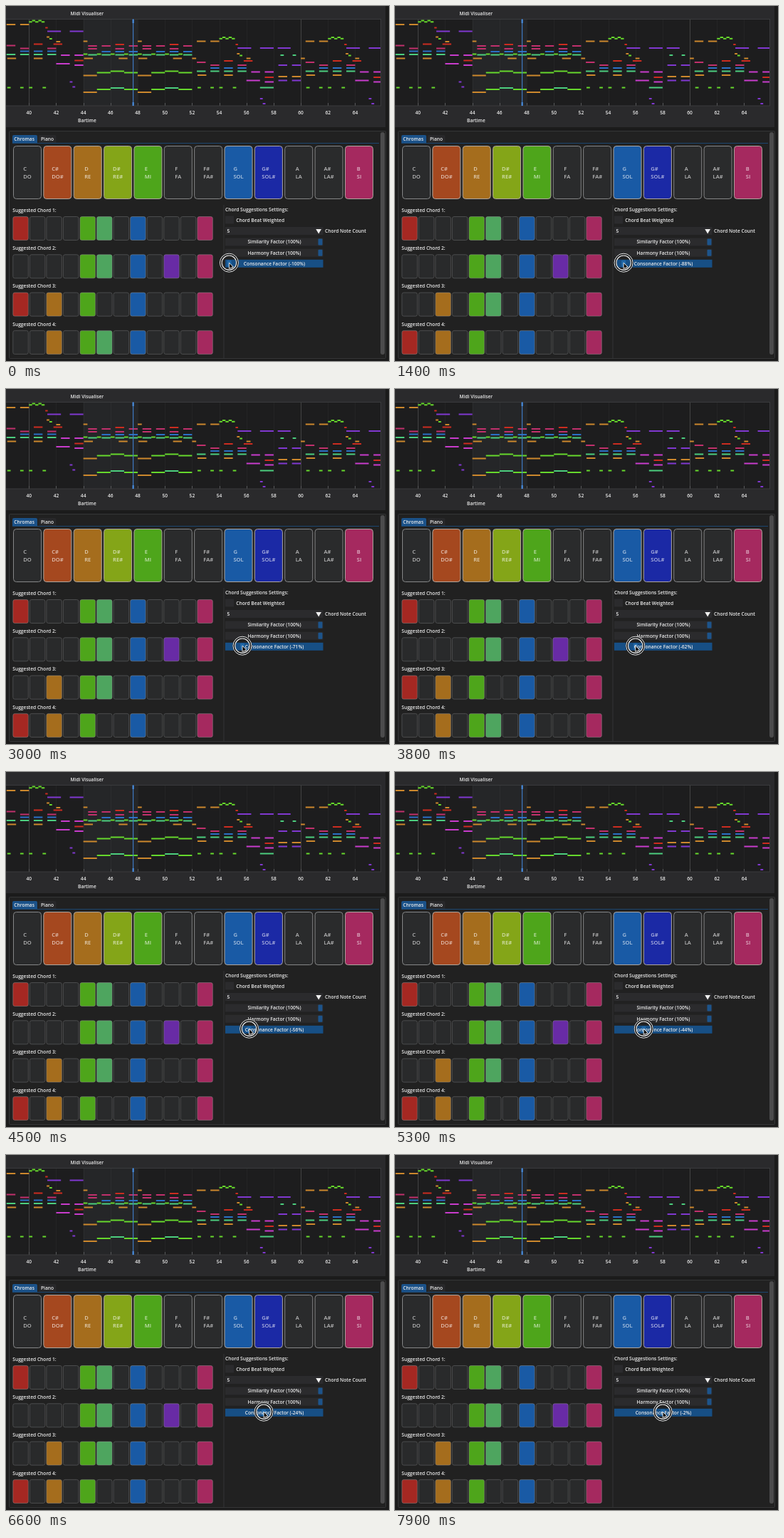
Animation, 538 px wide and 498 px high, one loop 8 s. Source, as an HTML page with a canvas:

```html
<!DOCTYPE html>
<html lang="en">
<head>
<meta charset="utf-8">
<title>Midi Visualiser</title>
<style>
html, body { margin: 0; width: 100%; height: 100%; overflow: hidden; background: #1b1b1b; }
canvas { display: block; }
</style>
</head>
<body>
<canvas id="stage" width="538" height="498"></canvas>
<script>
const ctx = document.getElementById('stage').getContext('2d');
const LOOP = 8000, STEP = 100;
const FONT = '"Open Sans", "Noto Sans", sans-serif';
const INK = '#ececec', FRAME = '#2b2b2d', BLUE = '#174f85';

const NAMES = ['C', 'C#', 'D', 'D#', 'E', 'F', 'F#', 'G', 'G#', 'A', 'A#', 'B'];
const SOLFA = ['DO', 'DO#', 'RE', 'RE#', 'MI', 'FA', 'FA#', 'SOL', 'SOL#', 'LA', 'LA#', 'SI'];
const CHROMA = {
  C: '#a52822', 'C#': '#a5481f', D: '#a56d1d', 'D#': '#84a518', E: '#4ea51b',
  F: '#4ea55f', G: '#195aa5', 'G#': '#1b29a5', A: '#682ba5', B: '#a5295f'
};
const PLAYED = ['C#', 'D', 'D#', 'E', 'G', 'G#', 'B'];
const CHORDS = [
  ['C', 'E', 'F', 'G', 'B'], ['E', 'F', 'G', 'A', 'B'],
  ['C', 'D', 'E', 'G', 'B'], ['D', 'E', 'F', 'G', 'B']
];
const SWAPS = [500, 3200, 4100];

// [time, consonance percent]
const DRAG = [
  [0, -100], [1400, -88], [2200, -80], [3800, -62], [4500, -56],
  [5000, -46], [5100, -46], [5300, -44], [6600, -24], [7900, -2]
];

function consonance(t) {
  const i = DRAG.findIndex(k => k[0] >= t);
  if (i < 1) return DRAG[0][1];
  const [t0, a] = DRAG[i - 1], [t1, b] = DRAG[i];
  return Math.round(a + (b - a) * (t - t0) / (t1 - t0));
}

function rect(x, y, w, h, color) {
  ctx.fillStyle = color;
  ctx.fillRect(x, y, w, h);
}

function box(x, y, w, h, r, fill, line) {
  ctx.beginPath();
  ctx.roundRect(x, y, w, h, r);
  ctx.fillStyle = fill;
  ctx.fill();
  if (!line) return;
  ctx.strokeStyle = line;
  ctx.lineWidth = 1;
  ctx.stroke();
}

// y is the middle of the capitals
function text(s, x, y, align = 'left', size = 6.65, color = INK) {
  ctx.font = `600 ${size}px ${FONT}`;
  ctx.textAlign = align;
  ctx.fillStyle = color;
  ctx.fillText(s, x, y + size * 0.357);
}

/* Piano roll */
const beatX = b => 32.3 + (b - 40) * 19.09;
const NOTE = {
  O: '#cc872c', G: '#66d82c', T: '#4cce7e', P: '#c0306c',
  R: '#cc2c20', B: '#2a70c6', V: '#8038d0', M: '#c83ccc'
};

function note(color, y, from, to) {
  rect(beatX(from), y - 1, beatX(to) - beatX(from), 2, NOTE[color]);
}

function notes(color, y, start, offsets, len = 0.65) {
  for (const o of offsets) note(color, y, start + o, start + o + len);
}

function zigzag(start, y) {
  for (let i = 0; i < 5; i++) note('G', y + (i % 2 ? -1 : 0.8), start + i * 0.23, start + (i + 1) * 0.23);
}

function melody(s, dy) {
  notes('O', 49.5 + dy, s, [0.35, 1.35]);
  zigzag(s + 2, 45 + dy);
  notes('R', 54 + dy, s, [3.2], 0.18);
  notes('V', 59 + dy, s, [3.35, 5], 1);
  notes('O', 67 + dy, s, [3.3], 0.2);
  notes('G', 69.5 + dy, s, [3.5], 0.2);
  notes('O', 73.5 + dy, s, [0, 4], 0.3);
  notes('R', 77 + dy, s, [2.35, 3.8]);
  notes('P', 79 + dy, s, [0.35]);
  notes('P', 83 + dy, s, [1.35, 3.35]);
  notes('B', 87 + dy, s, [1.35, 2.35, 3.35]);
  notes('T', 91.5 + dy, s, [0.35, 1.35, 2.35, 3.35]);
  notes('M', 92.5 + dy, s, [4.35, 5.35]);
  notes('O', 97 + dy, s, [0.4, 2.35]);
  notes('M', 104.5 + dy, s, [4], 1);
  notes('R', 100 + dy, s, [5.35]);
  notes('M', 106.5 + dy, s, [5.35]);
  notes('V', 130 + dy, s, [5], 0.2);
  notes('V', 137 + dy, s, [5.2], 0.2);
  notes('G', 114.5, s, [0.4, 1.35, 2, 3], 0.25);
}

function backing(s) {
  notes('O', 49.5, s, [0], 0.3);
  notes('R', 54, s, [2.35]);
  notes('P', 56, s, [0.35, 1.35, 3.35]);
  notes('P', 60, s, [0.35, 2.35]);
  notes('B', 64, s, [1.35, 2.35, 3.35]);
  notes('G', 67.5, s, [0, 1, 2, 3], 0.3);
  notes('T', 68.5, s, [0.35, 1.35, 2.35, 3.35]);
  notes('O', 73.5, s, [0.05, 2.6]);
  for (const [y, high] of [[97.5, 'G'], [121, 'T']]) {
    note('O', y, s, s + 1);
    note('G', y - 4, s + 1, s + 2);
    note(high, y - 6, s + 2, s + 3);
    note('G', y - 4, s + 3, s + 4);
  }
}

function roll() {
  rect(0, 0, 533, 170, '#2a2a2c');
  rect(0, 18, 526, 122, '#1d1d1e');
  rect(beatX(44), 18, beatX(48) - beatX(44), 122, '#252628');
  for (let b = 40; b < 66; b += 2) {
    const x = Math.round(beatX(b));
    rect(x, 18, 1, 122, b % 20 ? 'rgba(255,255,255,.035)' : 'rgba(255,255,255,.17)');
    rect(x, 136, 1, 4, '#58595b');
    text(b, beatX(b), 149.3, 'center');
  }
  ctx.save();
  ctx.beginPath();
  ctx.rect(0, 18, 526, 122);
  ctx.clip();
  melody(38, -23.5);
  backing(44);
  backing(48);
  melody(52, 0);
  notes('V', 59, 52, [6.3], 0.95);
  notes('O', 99, 52, [6.35, 7.35]);
  notes('V', 104.5, 52, [6.35, 7.35]);
  notes('T', 114.5, 52, [5], 1);
  notes('V', 83, 52, [6.35, 7.35]);
  notes('T', 69, 52, [6.5, 7.4], 0.25);
  melody(60, 0);
  ctx.restore();
  ctx.strokeStyle = '#3a3b3d';
  ctx.lineWidth = 1;
  ctx.strokeRect(-1, 18.5, 527.5, 121.5);
  rect(178, 18, 1.2, 122, '#3f78c0');
  rect(177.6, 19, 2, 5, '#4a94ea');
  rect(177.6, 135, 2, 5, '#4a94ea');
  text('Midi Visualiser', 90.5, 11);
  text('Bartime', 101, 161);
}

/* Lower panel */
function panel() {
  box(4.5, 175.5, 529, 319, 1, '#212121', '#353637');
  box(526, 177, 6, 312, 3, '#4b4b4c');
  box(9, 181, 35, 11.5, [2, 2, 0, 0], '#1b5289');
  box(45.5, 181, 25, 11.5, [2, 2, 0, 0], '#28282a');
  rect(9, 192, 515, 1, '#1b4670');
  text('Chromas', 11.3, 187);
  text('Piano', 49, 187);
}

function keys() {
  NAMES.forEach((name, i) => {
    const x = 10.5 + i * 42.36;
    const on = PLAYED.includes(name);
    box(x, 196.5, 39, 74, 4, on ? CHROMA[name] : '#2a2b2c', on ? '#aea69e' : '#858687');
    ctx.font = `600 7.6px ${FONT}`;
    const left = x + 19.5 - ctx.measureText(SOLFA[i]).width / 2;
    const ink = 'rgba(255,255,255,.68)';
    text(name, left, 228, 'left', 7.6, ink);
    text(SOLFA[i], left, 239, 'left', 7.6, ink);
  });
}

function chords(t) {
  const swapped = SWAPS.filter(s => t >= s).length % 2;
  for (let row = 0; row < 4; row++) {
    const y = row * 53.3;
    const chord = CHORDS[swapped && row > 1 ? 5 - row : row];
    text(`Suggested Chord ${row + 1}:`, 9.3, 286.3 + y);
    NAMES.forEach((name, i) => {
      const on = chord.includes(name);
      box(9.8 + i * 23.55, 295.5 + y, 21.5, 33, 2.5,
        on ? CHROMA[name] : '#292a2b', on ? 'rgba(150,150,150,.45)' : '#4b4c4d');
    });
  }
}

function slider(label, value, y, active) {
  rect(308, y, 137.5, 11, active ? BLUE : FRAME);
  const x = 310.5 + (value + 100) * 0.64;
  box(x, y + 1, 6, 9, 1, active ? '#2168a8' : '#1d548b');
  text(`${label} Factor (${value}%)`, 377, y + 5.6, 'center');
}

function settings(value) {
  rect(305.5, 279, 1, 215, '#343536');
  text('Chord Suggestions Settings:', 308, 285.3);
  rect(308, 294.5, 12, 11, FRAME);
  text('Chord Beat Weighted', 323.3, 300.3);
  rect(308, 310, 137.5, 11, FRAME);
  text('5', 310.5, 315.7);
  text('Chord Note Count', 448, 315.7);
  ctx.beginPath();
  ctx.moveTo(435.3, 313);
  ctx.lineTo(443, 313);
  ctx.lineTo(439.2, 319.5);
  ctx.fillStyle = '#f0f0f0';
  ctx.fill();
  slider('Similarity', 100, 325.5);
  slider('Harmony', 100, 340.7);
  slider('Consonance', value, 355.8, true);
}

function ring(x, y, r, width, color) {
  ctx.beginPath();
  ctx.arc(x, y, r, 0, Math.PI * 2);
  ctx.lineWidth = width;
  ctx.strokeStyle = color;
  ctx.stroke();
}

function pointer(value) {
  const x = 377.4 + value * 0.64, y = 360.2;
  ring(x, y, 11.7, 4, '#1b1c1d');
  ring(x, y, 13, 1, '#e8e8e8');
  ring(x, y, 10.2, 1.1, '#f0f0f0');
  ctx.save();
  ctx.translate(x, y);
  ctx.beginPath();
  ctx.moveTo(0, 0);
  for (const [px, py] of [[0, 8.5], [2, 6.8], [3.4, 9.8], [5, 9], [3.6, 6.2], [6.2, 6]]) ctx.lineTo(px, py);
  ctx.closePath();
  ctx.fillStyle = '#0c0c0c';
  ctx.fill();
  ctx.lineWidth = 0.9;
  ctx.strokeStyle = '#f4f4f4';
  ctx.stroke();
  ctx.restore();
}

function draw(now) {
  const t = Math.floor((now % LOOP) / STEP) * STEP;
  const value = consonance(t);
  rect(0, 0, 538, 498, '#1b1b1b');
  roll();
  panel();
  keys();
  chords(t);
  settings(value);
  pointer(value);
}

const start = performance.now();
function tick() {
  draw(performance.now() - start);
  requestAnimationFrame(tick);
}
tick();
</script>
</body>
</html>
```
